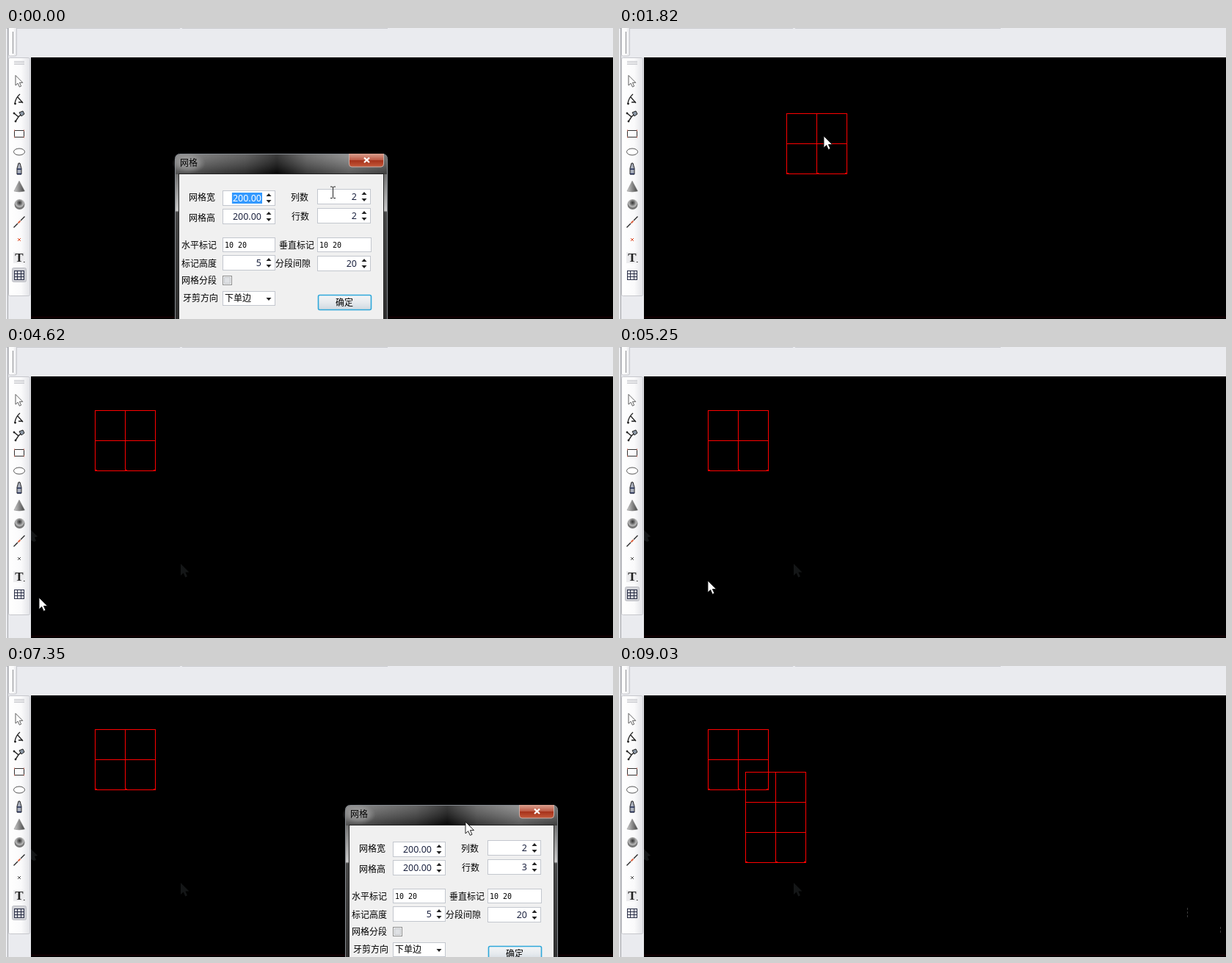
An HTML page that plays this animation: 827 by 396 pixels, repeating every 9.73 s.

```html
<!DOCTYPE html>
<html lang="zh">
<head>
<meta charset="utf-8">
<style>
html, body { margin: 0; width: 100%; height: 100%; overflow: hidden; background: #eaebef; }
svg { position: absolute; left: 0; top: 0; overflow: visible; }
#dlg { transform-origin: 144.5px 117px; }
.ui { font: 12px "Noto Sans CJK SC", "Noto Sans CJK", sans-serif; fill: #000; }
.num { font: 12.5px "Noto Sans", "Open Sans", sans-serif; fill: #1c2340; text-anchor: end; }
.mono { font: 10px "DejaVu Sans Mono", monospace; fill: #000; }
.crisp { shape-rendering: crispEdges; }
</style>
</head>
<body>
<svg id="stage" width="827" height="396" viewBox="0 0 827 396">
  <defs>
    <linearGradient id="panel"><stop offset="0" stop-color="#fff"/><stop offset=".6" stop-color="#fafafb"/><stop offset="1" stop-color="#e2e3e7"/></linearGradient>
    <linearGradient id="cone"><stop offset="0" stop-color="#ccc"/><stop offset="1" stop-color="#444"/></linearGradient>
    <radialGradient id="ball" cy=".35"><stop offset="0" stop-color="#333"/><stop offset=".4" stop-color="#777"/><stop offset=".75" stop-color="#bbb"/><stop offset="1" stop-color="#777"/></radialGradient>
    <path id="arrow" d="M0 0V16L3.7 12.6L6.3 18.4L9 17.2L6.4 11.6H11.5Z"/>
  </defs>
  <rect width="827" height="396" fill="#eaebef"/>
  <path class="crisp" d="M0 .5H237M240 .5H520" stroke="#c9cacf"/>
  <path class="crisp" d="M2.5 0V396" stroke="#a3a4a8"/>
  <rect x="3.5" y="-3" width="11" height="41" rx="2" fill="url(#panel)" stroke="#c6c7cc"/>
  <path class="crisp" d="M9.5 5V35" stroke="#8d8e92"/>
  <rect x="3.5" y="40.5" width="29" height="324" rx="2" fill="url(#panel)" stroke="#c6c7cc"/>
  <path class="crisp" d="M11 45.5H25M11 47.5H25M11 49.5H25" stroke="#c4c5ca"/>
  <rect x="34" y="40" width="793" height="356"/>
  <path class="crisp" d="M34 393.5H827" stroke="#200003"/>

  <g id="icons" fill="none" stroke="#222">
    <use href="#arrow" transform="translate(13 64.5) scale(.85)" fill="#fff" stroke="#444"/>
    <path d="M12 103Q13 95 19 90M16 94L23 102M17 101H23" stroke-width="1.3"/><circle cx="12.5" cy="103" r="1" fill="#222"/>
    <path d="M11 116L17 121L13 127M17 121L21 117" stroke-width="1.4"/><path d="M18 115L23 113L25 117L21 120Z" fill="#8b97a5"/><circle cx="11" cy="116" r="1" fill="#222"/><circle cx="13" cy="127" r="1" fill="#222"/>
    <rect class="crisp" x="11.5" y="139.5" width="13" height="9" stroke="#333"/>
    <path d="M11 139.5h1M24 139.5h1M11 148.5h1M24 148.5h1" stroke="#d06a5a" stroke-width="2"/>
    <ellipse cx="18" cy="168.5" rx="7.5" ry="4.5" fill="#fff" stroke="#555"/>
    <path d="M17 184H19L21 191V199H15V191Z" fill="#aab0bd"/><path d="M15 192H21M15 198.5H21" stroke="#222c55" stroke-width="1.5"/>
    <path d="M18 208L25.5 222Q18 224 11 222Z" fill="url(#cone)" stroke="#888" stroke-width=".5"/>
    <circle cx="18.5" cy="240" r="7" fill="url(#ball)" stroke="none"/>
    <path d="M10.5 271.5L16 266M20 262L25.5 256.5" stroke-width="1.3"/><path d="M16.5 265.5L19.5 262.5" stroke="#d9603f" stroke-width="2"/>
    <path id="mark" d="M16 286L20 290M20 286L16 290"/>
    <rect x="10" y="305" width="16" height="15" fill="#ececee" stroke="none"/>
    <text x="18" y="318" text-anchor="middle" font-family="Liberation Serif, serif" font-size="17" font-weight="bold" fill="#222" stroke="none">T</text>
    <path d="M24 318.5H25.5"/>
    <rect id="hot" x="8.5" y="326.5" width="19" height="19" rx="2" fill="#d2d3d8" stroke="#bcbdc3"/>
    <path class="crisp" d="M11.5 330.5H24.5V342.5H11.5ZM11 334.5H24M11 338.5H24M15.5 330V342M20.5 330V342" stroke="#2b3048"/>
  </g>

  <g id="trace" fill="#141617">
    <use href="#arrow" x="238" y="295"/>
    <path d="M34 249L43 258L39 259L41 264L38 265L34 263Z"/>
  </g>
  <path id="dash" d="M774.5 329V343M819.5 355V364" stroke="#3a3a3a" stroke-dasharray="3 2"/>
  <path id="grids" class="crisp" fill="none" stroke="#f00"/>
</svg>

<svg id="dlg" width="290" height="234" viewBox="0 0 290 234">
  <defs>
    <linearGradient id="glass"><stop offset="0" stop-color="#777"/><stop offset=".15" stop-color="#555"/><stop offset=".33" stop-color="#393939"/><stop offset=".48" stop-color="#050505"/><stop offset=".62" stop-color="#4a4a4a"/><stop offset=".82" stop-color="#777"/><stop offset="1" stop-color="#555"/></linearGradient>
    <linearGradient id="shade" x2="0" y2="1"><stop offset="0" stop-color="#fff" stop-opacity=".22"/><stop offset="1" stop-color="#000" stop-opacity=".3"/></linearGradient>
    <linearGradient id="side" x2="0" y2="1"><stop offset="0" stop-color="#444"/><stop offset=".3" stop-color="#bbb"/><stop offset=".33" stop-color="#c8c8c8"/><stop offset=".34" stop-color="#484848"/><stop offset="1" stop-color="#2c2c2c"/></linearGradient>
    <linearGradient id="red" x2="0" y2="1"><stop offset="0" stop-color="#d9a08f"/><stop offset=".48" stop-color="#bd5a45"/><stop offset=".5" stop-color="#a5301a"/><stop offset="1" stop-color="#c4593a"/></linearGradient>
    <linearGradient id="plain" x2="0" y2="1"><stop offset="0" stop-color="#f4f5f6"/><stop offset=".5" stop-color="#e6eaee"/><stop offset="1" stop-color="#cfd8df"/></linearGradient>
    <linearGradient id="lit" x2="0" y2="1"><stop offset="0" stop-color="#e4f2fb"/><stop offset=".5" stop-color="#c4e3f5"/><stop offset=".52" stop-color="#9fd2ee"/><stop offset="1" stop-color="#86c2e4"/></linearGradient>
    <radialGradient id="glow"><stop offset="0" stop-color="#bbb" stop-opacity=".75"/><stop offset=".6" stop-color="#aaa" stop-opacity=".45"/><stop offset="1" stop-color="#999" stop-opacity="0"/></radialGradient>
  </defs>
  <rect x=".5" y=".5" width="289" height="233" rx="6" fill="url(#side)"/>
  <path d="M1 28V7Q1 1 7 1H283Q289 1 289 7V28Z" fill="url(#glass)"/>
  <path d="M1 28V7Q1 1 7 1H283Q289 1 289 7V28Z" fill="url(#shade)"/>
  <path id="dim" d="M1 233V7Q1 1 7 1H283Q289 1 289 7V233Z" fill="#1b1f24" opacity=".85"/>
  <rect x=".5" y=".5" width="289" height="233" rx="6" fill="none" stroke="#858a90"/>
  <ellipse cx="19" cy="13" rx="23" ry="14" fill="url(#glow)"/>
  <text class="ui" x="7" y="17">网格</text>
  <path id="close" d="M237.500 0V14Q237.500 18 241 18H281Q284.500 18 284.500 14V0"/>
  <path d="M258 5.500L265 12M265 5.500L258 12" stroke="#fff" stroke-width="2.300"/>
  <rect x="5.500" y="27.500" width="279" height="201" fill="#f0f0f0" stroke="#222"/>
  <g id="form"></g>
</svg>

<svg id="top" width="827" height="396" viewBox="0 0 827 396" pointer-events="none">
  <use id="cursor" href="#arrow" fill="#fff" stroke="#111" stroke-width=".9"/>
  <path id="beam" d="M-3.500 -7.500H-1L0 -6.500L1 -7.500H3.500M0 -6.500V7M-3.500 8H-1L0 7L1 8H3.500" fill="none" stroke="#222"/>
</svg>

<script>
const $ = id => document.getElementById(id);
const set = (id, attrs) => { for (const k in attrs) $(id).setAttribute(k, attrs[k]); };
const show = (id, on) => set(id, { display: on ? 'inline' : 'none' });
const within = (t, a, b) => t >= a && t < b;
const STEP = 70, LAST = 9030, LOOP = 9730, CELL = 41;

// time, x, y of the pointer
const path = [
  [0, 445, 223], [420, 460, 368], [630, 460, 368], [840, 390, 262],
  [1050, 270, 195], [1330, 17, 68], [1470, 17, 68], [1750, 279, 147],
  [1890, 279, 147], [2240, 172, 117], [2380, 172, 117], [2590, 150, 267],
  [2660, 150, 267], [2940, 37, 255], [3150, 17, 332], [3290, 17, 332],
  [3500, 238, 295], [3570, 238, 295], [3850, 605, 262], [3990, 605, 262],
  [4620, 45, 341], [4970, 17, 332], [5110, 17, 332], [5600, 540, 262],
  [5740, 540, 262], [6020, 783, 333], [6160, 783, 333], [6370, 805, 355],
  [6440, 805, 355], [6580, 780, 332], [6720, 691, 335], [6860, 691, 335],
  [7000, 691, 275], [7070, 691, 275], [7420, 619, 205], [7700, 680, 374],
  [7980, 680, 374], [8190, 678, 348], [8680, 495, 370], [8750, 495, 370],
  [8890, 365, 245], [8960, 285, 270]
];

function pointer(t) {
  const i = path.findIndex(p => p[0] > t);
  if (i < 0) return path[path.length - 1].slice(1);
  const [a, ax, ay] = path[i - 1], [b, bx, by] = path[i];
  const u = (t - a) / (b - a), k = u * u * (3 - 2 * u);
  return [Math.round(ax + (bx - ax) * k), Math.round(ay + (by - ay) * k)];
}

// pointer travel while the button is held between two times
function dragged(t, from, to) {
  const [ax, ay] = pointer(from), [bx, by] = pointer(Math.max(from, Math.min(t, to)));
  return [bx - ax, by - ay];
}

const label = (x, y, s) => `<text class="ui" x="${x}" y="${y + 4.5}">${s}</text>`;
const box = (x, y, w, h, id = '') =>
  `<rect ${id && `id="${id}"`} x="${x + .5}" y="${y + .5}" width="${w - 1}" height="${h - 1}" fill="#fff" stroke="#c3c7ce"/>`;
const tri = (x, y, d) => `<path d="M${x - 3.5} ${y + 2 * d}H${x + 3.5}L${x} ${y - 2 * d}Z" fill="#222"/>`;

function spin(x, y, w, value, id) {
  const right = x + w - 19, wide = value.length * 6.6;
  return box(x, y, w, 21) + tri(x + w - 9, y + 6, 1) + tri(x + w - 9, y + 15, -1) +
    `<rect id="${id}Sel" x="${right - wide - .5}" y="${y + 3}" width="${wide + 1.5}" height="15" fill="#3399ff" display="none"/>` +
    `<text id="${id}" class="num" x="${right}" y="${y + 15}">${value}</text>`;
}

$('form').innerHTML =
  label(19, 59, '网格宽') + label(19, 87, '网格高') + label(158, 59, '列数') + label(159, 85, '行数') +
  label(9, 124, '水平标记') + label(142, 124, '垂直标记') + label(9, 149, '标记高度') +
  label(137, 149, '分段间隙') + label(9, 172, '网格分段') + label(11, 196, '牙剪方向') +
  spin(65, 50, 72, '200.00', 'wide') + spin(65, 75, 72, '200.00', 'high') +
  spin(194, 48, 73, '2', 'cols') + spin(194, 74, 73, '2', 'rows') +
  spin(65, 138, 72, '5', 'tall') + spin(194, 139, 73, '20', 'gap') +
  box(65, 114, 72, 20) + box(194, 114, 74, 20, 'vert') +
  '<text class="mono" x="68" y="127.500">10 20</text><text class="mono" x="197" y="127.500">10 20</text>' +
  '<rect x="65.500" y="166.500" width="12" height="12" fill="#f4f4f4" stroke="#8e8f8f"/><rect x="67.500" y="168.500" width="8" height="8" fill="#dfe1e4" stroke="#c5c8cc"/>' +
  box(65, 187, 72, 20) + label(68, 196, '下单边') + tri(128, 198, -1) +
  '<rect id="ok" x="195.500" y="192.500" width="72" height="20" rx="2"/>' + label(219, 202, '确定');

function grid(x, y, cols, rows) {
  const w = cols * CELL, h = rows * CELL;
  let d = '';
  for (let j = 0; j <= rows; j++) d += `M${x} ${y + j * CELL + .5}h${w + 1}`;
  for (let i = 0; i <= cols; i++) {
    d += `M${x + i * CELL + .5} ${y}v${h + 1}`;
    // small marks along the bottom edge
    d += `M${x + i * CELL + (i < cols ? 1 : -2)} ${y + h - .5}h2`;
  }
  return d;
}

function drawGrids(t) {
  const [dx, dy] = dragged(t, 1890, 2240);
  set('grids', {
    d: (t >= 630 ? grid(228 + dx, 116 + dy, 2, 2) : '') + (t >= 8120 ? grid(172, 144, 2, 3) : '')
  });
}

function drawDialog(t) {
  const first = t < 2000;
  const shutAt = first ? 680 : 8150;
  const closing = t > shutAt;
  const q = closing ? (t - shutAt) / 160 : first ? 0 : Math.max(0, (5950 - t) / 160);
  const alpha = 1 - .6 * q * q;
  $('dlg').style.display = alpha > 0 ? 'block' : 'none';
  if (alpha <= 0) return;

  const [dx, dy] = dragged(t, 7070, 7420);
  const s = $('dlg').style;
  s.left = (first ? 230 : 527 + dx) + 'px';
  s.top = (first ? 171 : 252 + dy) + 'px';
  s.opacity = alpha;
  s.transform = q ? `translateX(${-q}px) perspective(520px) rotateX(${6 * q}deg) scale(${1 - .037 * q})` : 'none';

  show('dim', closing);
  set('close', closing ? { fill: '#2a2c30', stroke: '#888' } : { fill: 'url(#red)', stroke: '#c9b0aa' });
  const pick = t < 490, pickRow = within(t, 6650, 6860);
  show('wideSel', pick);
  show('rowsSel', pickRow);
  $('wide').style.fill = pick ? '#fff' : '';
  $('rows').style.fill = pickRow ? '#fff' : '';
  $('rows').textContent = t >= 6860 ? '3' : '2';
  set('vert', { stroke: within(t, 6230, 6930) ? '#5aa7dc' : '#c3c7ce' });
  const lit = within(t, 350, 1000) || t >= 7630;
  set('ok', { fill: lit ? 'url(#lit)' : 'url(#plain)', stroke: lit ? '#4d87a8' : '#2fa8da', 'stroke-width': lit ? 1 : 1.6 });
}

function draw(t) {
  const [x, y] = pointer(t);
  set('cursor', { transform: `translate(${x} ${y})` });
  set('beam', { transform: `translate(${x + .5} ${y + .5})` });
  show('beam', t < 140);
  show('cursor', within(t, 140, LAST));
  show('hot', t < 630 || within(t, 5110, 8120));
  set('mark', { stroke: t < 3500 ? '#e0512c' : '#555' });
  show('trace', t >= 3640);
  show('dash', t >= 7420);
  drawGrids(t);
  drawDialog(t);
}

let start, shown = -1;
function tick(now) {
  start ??= now;
  const t = Math.min(LAST, Math.floor(((now - start) % LOOP) / STEP) * STEP);
  if (t !== shown) draw(shown = t);
  requestAnimationFrame(tick);
}
draw(0);
requestAnimationFrame(tick);
</script>
</body>
</html>
```
